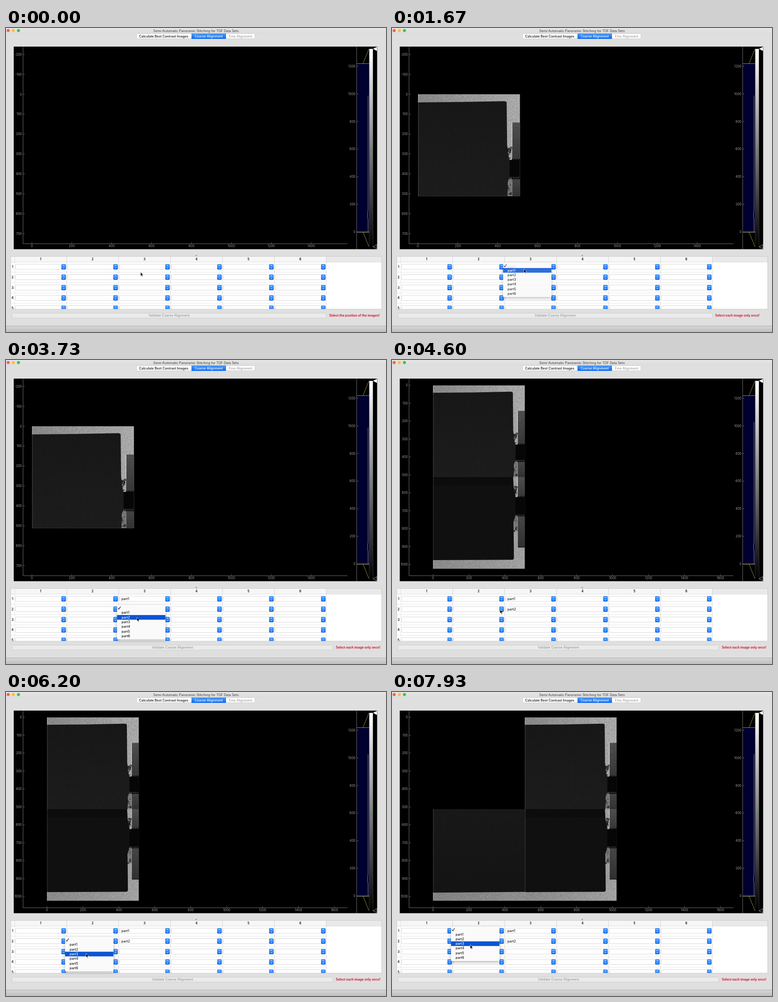
Animation, 836 px wide and 670 px high, one loop 8 s. Source, as an HTML page with a canvas:

```html
<!DOCTYPE html>
<html lang="en">
<head>
<meta charset="utf-8">
<title>Panoramic Stitching</title>
<style>
  html, body { margin: 0; width: 100%; height: 100%; overflow: hidden; background: #dfdfdf; }
  svg, canvas { position: absolute; left: 0; top: 0; display: block; }
  text { font: 7.25px Inter, sans-serif; fill: #111; white-space: pre; }
  .mid { text-anchor: middle; }
  .end { text-anchor: end; }
  .med { font-weight: 500; }
  .head { font-weight: 600; font-size: 7px; }
  .axis { font-size: 7px; fill: #a2a2a2; }
  .warn { font-weight: 600; font-size: 6.9px; fill: #d0021b; }
</style>
</head>
<body>
<svg id="ui" width="836" height="670" viewBox="0 0 836 670">
  <defs>
    <linearGradient id="bar" x2="0" y2="1"><stop stop-color="#e6e6e6"/><stop offset="1" stop-color="#dcdcdc"/></linearGradient>
    <linearGradient id="foot" x2="0" y2="1"><stop stop-color="#d6d6d6"/><stop offset="1" stop-color="#bebebe"/></linearGradient>
    <linearGradient id="blue" x2="0" y2="1"><stop stop-color="#4d9cf8"/><stop offset="1" stop-color="#0a68f2"/></linearGradient>
    <linearGradient id="ramp" x2="0" y2="1"><stop stop-color="#fff"/><stop offset="1" stop-color="#000"/></linearGradient>
    <filter id="soft" x="-20%" y="-20%" width="140%" height="150%"><feDropShadow dx="0" dy="2.5" stdDeviation="3" flood-opacity=".32"/></filter>
  </defs>
</svg>
<canvas id="photo" width="836" height="500"></canvas>
<svg id="over" width="836" height="670" viewBox="0 0 836 670"></svg>
<script>
const LOOP = 8000, STEP = 1000 / 15;
const ui = document.getElementById('ui');
const over = document.getElementById('over');
const ctx = document.getElementById('photo').getContext('2d', { willReadFrequently: true });

function add(parent, tag, attrs, content) {
  const el = document.createElementNS('http://www.w3.org/2000/svg', tag);
  for (const k in attrs) el.setAttribute(k, attrs[k]);
  if (content !== undefined) el.textContent = content;
  parent.appendChild(el);
  return el;
}
const rect = (p, x, y, width, height, fill, more) => add(p, 'rect', { x, y, width, height, fill, ...more });
const line = (p, d, stroke, w = 1) => add(p, 'path', { d, stroke, 'stroke-width': w, fill: 'none' });
const label = (p, x, y, s, cls = '', more) => add(p, 'text', { x, y, class: cls, ...more }, s);
const show = (el, on) => el.setAttribute('visibility', on ? 'visible' : 'hidden');

// ---- window chrome ----
rect(ui, 0, 0, 836, 670, '#dfdfdf');
rect(ui, 0, 0, 836, 12, 'url(#bar)');
['#fc5b57', '#fdbc40', '#34c84a'].forEach((fill, i) =>
  add(ui, 'circle', { cx: 4.8 + i * 11.3, cy: 5.6, r: 3.4, fill }));
label(ui, 418, 8.6, 'Semi-Automatic Panoramic Stitching for TOF Data Sets', 'mid', { fill: '#333', style: 'fill:#3c3c3c' });

rect(ui, 287.5, 12.5, 260, 11, '#fff', { rx: 2, stroke: '#c6c6c6', 'stroke-width': .7 });
rect(ui, 408, 12, 76, 12, 'url(#blue)');
label(ui, 347, 20.6, 'Calculate Best Contrast Images', 'mid med');
label(ui, 446, 20.6, 'Coarse Alignment', 'mid med', { style: 'fill:#fff' });
label(ui, 516, 20.6, 'Fine Alignment', 'mid', { style: 'fill:#8c8c8c' });

// ---- plot ----
const AXIS = '#6c6c6c';
rect(ui, 17, 41, 799.5, 446.5, '#000');
line(ui, 'M37.5 41V475.5H751', AXIS);

function axes(x0, y0, k, xMax, yMin, yMax) {
  const g = add(ui, 'g', {});
  for (let v = 0; v <= xMax; v += 200) {
    const x = x0 + v * k;
    line(g, `M${x} 475v-3`, AXIS);
    label(g, x, 482.6, v, 'axis mid');
  }
  for (let v = yMin; v <= yMax; v += 100) {
    const y = y0 + v * k;
    line(g, `M38 ${y}h3`, AXIS);
    label(g, 35, y + 2.5, v, 'axis end');
  }
  return g;
}
const nearAxes = axes(57, 146, .4388, 1400, -200, 700);
const farAxes = axes(90.3, 55.7, .3952, 1600, 0, 1000);

// ---- histogram ----
rect(ui, 772, 78, 27, 372, '#000030');
line(ui, 'M771.5 41V487', AXIS);
for (let v = 0; v <= 1200; v += 200) {
  const y = 449.5 - v * .3043;
  line(ui, `M772 ${y}h3`, AXIS);
  label(ui, 769, y + 2.5, v, 'axis end');
}
line(ui, 'M772 78.5H799M785.5 78L798.5 46M772 450H799M785.5 450L798.5 482', '#8d8d45');
add(ui, 'path', { d: 'M773 449.6H799', stroke: '#c8c8c8', 'stroke-dasharray': '2 1.2' });
const curve = line(ui, '', '#8f8fa6', .9);
rect(ui, 799, 46, 8, 436, 'url(#ramp)');
line(ui, 'M799 46V482M807.5 46V482', '#4b4b4b', .6);
add(ui, 'path', { d: 'M807.5 46L816 41.5V50.5Z', fill: '#fff' });
add(ui, 'path', { d: 'M807.5 482L816 477.5V486.5Z', fill: '#000', stroke: '#b5b5b5', 'stroke-width': .8 });
add(ui, 'path', { d: 'M802.5 262.5v9M805 261v11', stroke: '#1f9a2c', 'stroke-width': 1, 'stroke-dasharray': '1.2 1.6' });

// ---- table ----
const COL = 114.25, ROW = 22.85;
add(ui, 'circle', { cx: 418.5, cy: 501.5, r: 1.8, fill: '#a9a9a9' });
rect(ui, 10.5, 503.5, 816, 116, '#fff', { stroke: '#c4c4c4', 'stroke-width': .8 });
rect(ui, 11, 504, 694, 12, '#f6f6f6');
rect(ui, 705, 504, 121, 12, '#e9e9e9');
line(ui, 'M11 516H826', '#d2d2d2', .7);
const body = add(ui, 'svg', { x: 0, y: 0, width: 836, height: 619.3, viewBox: '0 0 836 619.3' });
line(body, 'M19.3 504V619', '#dadada', .7);
for (let c = 0; c < 6; c++) {
  label(body, 76.3 + c * COL, 512.2, c + 1, 'head mid');
  line(body, `M${133.5 + c * COL} 504V619`, '#c9c9c9', .8);
}
for (let r = 0; r < 5; r++) {
  const y = 526.2 + r * ROW;
  label(body, 14.4, y + 2.6, r + 1, 'head mid');
  line(body, `M11 ${y + 12}H705`, '#dcdcdc', .7);
  for (let c = 0; c < 6; c++) {
    const x = 21 + c * COL;
    rect(body, x, y - 5.6, 110.6, 11.4, '#fff', { rx: 2, stroke: '#cdcdcd', 'stroke-width': .8 });
    rect(body, x + 100.8, y - 6, 10, 12, 'url(#blue)', { rx: 2 });
    line(body, `M${x + 103.9} ${y - 1.3}l1.9 -2l1.9 2m0 2.6l-1.9 2l-1.9 -2`, '#fff', 1);
  }
}

// ---- footer ----
const button = rect(ui, 13.5, 628.5, 691, 10.5, '#ebebeb', { rx: 2, stroke: '#c9c9c9', 'stroke-width': .8 });
const buttonText = label(ui, 359, 636.2, 'Validate Coarse Alignment', 'mid', { style: 'fill:#8a8a8a' });
const warning = label(ui, 711, 636.2, '', 'warn');
rect(ui, 0, 657, 836, 13, 'url(#foot)');
line(ui, 'M0 656.8H836', '#a9a9a9');

// ---- menus: column, row, opening time, click time, picked item ----
const MENUS = [
  [2, 0, 467, 1533, 1],
  [2, 1, 2667, 3667, 2],
  [1, 1, 4933, 6133, 3],
  [1, 0, 7000, Infinity, 0]
].map(([col, row, open, click, item]) => ({
  col, row, open, click, item,
  load: click + 2 * STEP, shut: click + 3 * STEP, top: 518.7 + row * ROW,
  value: label(ui, 25.5 + col * COL, 528.8 + row * ROW, 'part' + item, 'med', { visibility: 'hidden' })
}));

const ITEM = 10.28;
const popup = add(over, 'g', {});
rect(popup, 0, -2, 106.5, ITEM * 7 + 4, '#fafafa', { rx: 1.5, filter: 'url(#soft)' });
const glow = rect(popup, 0, 0, 106.5, ITEM, '#0b55d4');
const tick = line(popup, 'M2 5.2l2 2.6l3.8 -6', '#111', 1.1);
const names = [];
for (let i = 1; i < 7; i++) names[i] = label(popup, 10, ITEM * (i + .5) + 2.5, 'part' + i, 'med');

const cursor = add(over, 'path', {
  d: 'M0 0V8.8L2 7L3.4 10.2L4.9 9.6L3.5 6.5H6.3Z',
  fill: '#000', stroke: '#fff', 'stroke-width': .7
});

// time, x, y
const PATH = [
  [0, 296, 538], [133, 295, 526], [733, 295, 526], [1000, 290, 531], [2133, 290, 531],
  [2600, 288, 549], [2867, 288, 549], [3000, 288, 556], [3200, 289, 590], [3333, 288, 567],
  [4000, 288, 567], [4600, 238, 550], [4867, 208, 549], [5200, 208, 549], [5333, 203, 556],
  [5400, 203, 556], [5667, 176, 576], [6333, 176, 576], [6933, 208, 524], [7333, 208, 524],
  [7933, 172, 557], [LOOP, 172, 557]
];
function pointer(t) {
  const i = Math.max(1, PATH.findIndex(p => p[0] >= t));
  const [a, b] = [PATH[i - 1], PATH[i]];
  const f = (t - a[0]) / (b[0] - a[0]);
  return [a[1] + (b[1] - a[1]) * f, a[2] + (b[2] - a[2]) * f];
}

// ---- radiographs, each 512 units square ----
let seed = 1;
const rand = () => (seed = seed * 16807 % 2147483647) / 2147483647;
function box(x, y, w, h, fill) { ctx.fillStyle = fill; ctx.fillRect(x, y, w, h); }
function poly(fill, ...pts) {
  ctx.fillStyle = fill;
  ctx.beginPath();
  for (let i = 0; i < pts.length; i += 2) ctx.lineTo(pts[i], pts[i + 1]);
  ctx.fill();
}
function fade(x0, y0, x1, y1, from, to) {
  const g = ctx.createLinearGradient(x0, y0, x1, y1);
  g.addColorStop(0, from);
  g.addColorStop(1, to);
  return g;
}
function teeth(y, h) {
  for (let x = 470; x < 512; x += 11) poly('#050505', x, y, x + 5.5, y - h, x + 11, y);
}
function blobs(y0, y1, n) {
  for (let i = 0; i < n; i++) {
    const v = 15 + rand() * 95 | 0;
    ctx.fillStyle = `rgb(${v},${v},${v})`;
    ctx.beginPath();
    ctx.arc(449 + rand() * 19, y0 + rand() * (y1 - y0), 2 + rand() * 5, 0, 7);
    ctx.fill();
  }
}
function fixture(top, gap, gapEnd, bottom) {
  box(473, top, 39, gap - top, fade(0, top, 0, gap, '#4e4e4e', '#363636'));
  box(470, top, 3, (gap - top) * .65, '#d2d2d2');
  blobs(Math.max(gap - 66, 10), gap, 16);
  box(452, gap, 60, gapEnd - gap, '#060606');
  teeth(gap + 1, 9);
  box(473, gapEnd + 10, 39, bottom - gapEnd - 10, fade(0, gapEnd, 0, bottom, '#464646', '#303030'));
  box(452, gapEnd + 8, 20, 86, '#767676');
  blobs(gapEnd + 10, Math.min(bottom, gapEnd + 110), 13);
  box(452, gapEnd, 60, 10, '#3a3a3a');
  teeth(gapEnd + 11, 11);
  box(452, gapEnd, 60, 2, '#060606');
}
const PARTS = {
  1() {
    box(0, 0, 512, 512, fade(0, 0, 512, 0, '#868686', '#a9a9a9'));
    fixture(142, 330, 416, 512);
    poly(fade(0, 40, 0, 512, '#171717', '#1c1c1c'), 0, 41, 220, 39, 436, 35, 445, 40, 447, 250, 452, 300, 460, 330, 460, 416, 451, 440, 450, 512, 0, 512);
    box(256, 250, 2, 262, '#202020');
  },
  2() {
    box(0, 0, 512, 512, fade(0, 0, 512, 0, '#888', '#a0a0a0'));
    fixture(0, 112, 208, 392);
    box(473, 389, 39, 4, '#101010');
    poly('#101010', 0, 0, 446, 0, 450, 60, 460, 112, 460, 208, 449, 250, 451, 455, 444, 461, 0, 463);
    box(0, 0, 446, 46, '#0c0c0c');
  },
  3() {
    box(0, 0, 512, 512, fade(0, 0, 512, 0, '#828282', '#8e8e8e'));
    poly(fade(0, 0, 0, 465, '#181818', '#141414'), 0, 0, 512, 0, 512, 462, 0, 466);
  }
};
function place(id, x, y, k) {
  seed = 97 * id;
  ctx.save();
  ctx.translate(x, y);
  ctx.scale(k, k);
  ctx.beginPath();
  ctx.rect(0, 0, 512, 512);
  ctx.clip();
  PARTS[id]();
  box(0, 0, 5, 512, 'rgba(255,255,255,.09)');
  ctx.restore();
  const n = Math.ceil(512 * k), img = ctx.getImageData(x, y, n, n), d = img.data;
  for (let i = 0; i < d.length; i += 4) {
    const f = .88 + .24 * rand();
    for (let c = 0; c < 3; c++) d[i + c] *= f;
  }
  ctx.putImageData(img, x, y);
}
const SCENES = [
  () => {},
  () => place(1, 57, 146, .4388),
  () => { place(1, 90, 56, .3952); place(2, 90, 258, .3952); },
  () => { place(1, 292, 56, .3952); place(2, 292, 258, .3952); place(3, 90, 258, .3952); }
];

let scene = -1;
function setScene(n) {
  if (n === scene) return;
  scene = n;
  ctx.clearRect(0, 0, 836, 500);
  SCENES[n]();
  show(nearAxes, n < 2);
  show(farAxes, n > 1);
  curve.setAttribute('d', `M796.5 ${n < 2 ? 149 : 137}V402l-1 4v12l1 4V449`);
}

function drawMenu(t, y) {
  const m = MENUS.find(m => t >= m.open && t < m.shut);
  show(popup, m);
  show(glow, m && !(t >= m.click && t < m.click + STEP));
  if (!m) return;
  const hot = t >= m.click ? m.item : Math.max(0, Math.min(6, Math.floor((y - m.top) / ITEM)));
  popup.setAttribute('transform', `translate(${15.7 + m.col * COL} ${m.top})`);
  popup.setAttribute('opacity', t >= m.load ? .85 : 1);
  glow.setAttribute('y', hot * ITEM);
  const lit = glow.getAttribute('visibility') === 'visible';
  tick.setAttribute('stroke', lit && hot === 0 ? '#fff' : '#111');
  names.forEach((el, i) => el.style.fill = lit && i === hot ? '#fff' : '#111');
}

function render(now) {
  const t = Math.floor((now % LOOP + 4) / STEP) * STEP + 1;
  const [x, y] = pointer(Math.min(t, LOOP));
  cursor.setAttribute('transform', `translate(${x} ${y})`);
  setScene(MENUS.filter(m => t >= m.load).length);
  MENUS.forEach(m => show(m.value, t >= m.load));
  drawMenu(t, y);

  const wide = t >= 1800;
  button.setAttribute('width', wide ? 705.5 : 691);
  buttonText.setAttribute('x', wide ? 366.3 : 359);
  warning.setAttribute('x', wide ? 725.8 : 711);
  warning.textContent = scene ? 'Select each image only once!' : 'Select the position of the images!';
}

const start = performance.now();
(function tickFrame() {
  render(performance.now() - start);
  requestAnimationFrame(tickFrame);
})();
</script>
</body>
</html>
```
